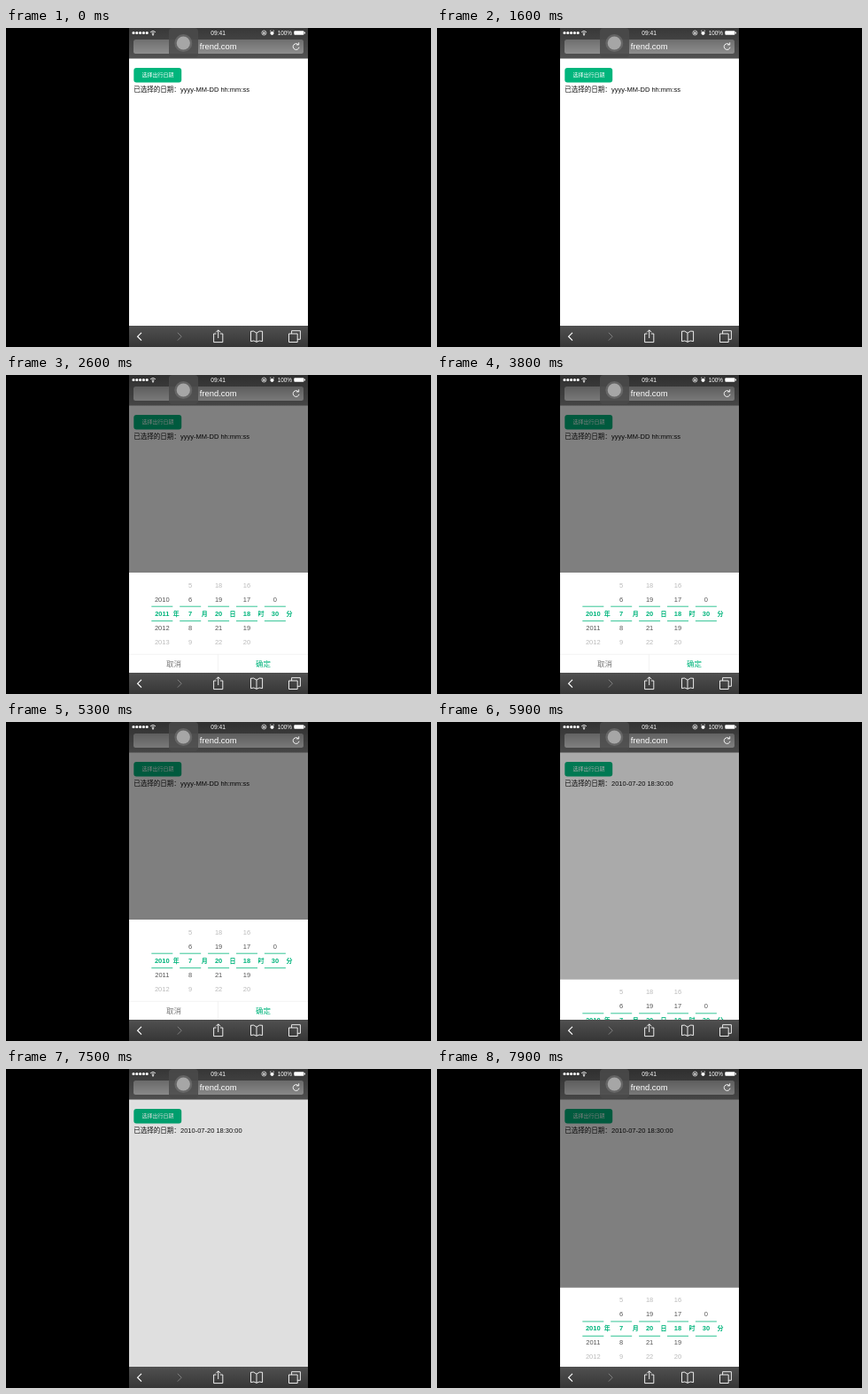
An HTML page that plays this animation: 480 px wide and 360 px high, repeating every 8 s.

```html
<!DOCTYPE html>
<html lang="zh">
<head>
<meta charset="utf-8">
<style>
html, body { margin: 0; width: 100%; height: 100%; overflow: hidden; background: #000; }
svg { display: block; width: 480px; height: 360px; }
text { font: 7.5px "Liberation Sans", "Noto Sans CJK SC", "Noto Sans CJK", sans-serif; }
.mid { text-anchor: middle; }
.bold { font-weight: bold; }
.line { fill: none; stroke: #fff; stroke-width: .9; }
</style>
</head>
<body>
<svg viewBox="0 0 480 360">
  <defs>
    <linearGradient id="head" x2="0" y2="1"><stop stop-color="#383838"/><stop offset="1" stop-color="#525252"/></linearGradient>
    <linearGradient id="field" x2="0" y2="1"><stop stop-color="#6e6e6e"/><stop offset="1" stop-color="#8e8e8e"/></linearGradient>
    <linearGradient id="foot" x2="0" y2="1"><stop stop-color="#505050"/><stop offset="1" stop-color="#363636"/></linearGradient>
    <clipPath id="page"><rect x="139" y="34" width="202" height="302"/></clipPath>
  </defs>

  <g clip-path="url(#page)">
    <rect x="139" y="34" width="202" height="302" fill="#fff"/>
    <rect x="144.3" y="45" width="53.9" height="16.5" rx="3" fill="#00b57c"/>
    <text class="mid" x="171.4" y="55.4" fill="#fff" style="font-size:6px">选择出行日期</text>
    <text x="144.3" y="72.4" fill="#111">已选择的日期：</text>
    <text id="date" x="197" y="72.4" fill="#111"></text>
    <rect id="shade" x="139" y="34" width="202" height="302"/>
    <g id="sheet">
      <rect x="139" width="202" height="114" fill="#fff"/>
      <g id="picker"></g>
      <path d="M139 92.3H341M239.5 92.3V114" stroke="#eee" stroke-width=".7"/>
      <text class="mid" x="189.5" y="105.6" fill="#777" style="font-size:8.5px">取消</text>
      <text class="mid" x="290.5" y="105.6" fill="#00b57c" style="font-size:8.5px">确定</text>
    </g>
  </g>

  <rect x="139" width="202" height="34.5" fill="url(#head)"/>
  <rect x="144" y="13" width="192" height="16" rx="2.5" fill="url(#field)"/>
  <rect id="tint" x="139" width="202" height="34.5"/>
  <rect x="184" y="0" width="33" height="33" rx="4" fill="#4a4a4a" opacity=".85"/>
  <circle cx="200.3" cy="17" r="10" fill="#777" opacity=".6"/>
  <circle cx="200.3" cy="17" r="7.6" fill="#a6a6a6"/>
  <g fill="#fff">
    <text class="mid" x="239.7" y="24.2" style="font-size:9.4px">frend.com</text>
    <text class="mid" x="239.6" y="7.8" style="font-size:6.6px">09:41</text>
    <text x="306.7" y="7.8" style="font-size:6.4px">100%</text>
    <path d="M144 5.5H160" stroke="#fff" stroke-width="3.2" stroke-linecap="round" stroke-dasharray="0 3.8"/>
    <rect x="325.3" y="3.3" width="11.2" height="4.4" rx="1"/>
    <rect x="337" y="4.6" width="1" height="1.8"/>
    <circle cx="166" cy="7.5" r=".9"/>
    <circle cx="300.5" cy="5.8" r="2.1"/>
    <path d="M298 3.6l1.3-1M303 3.6l-1.3-1" stroke="#fff" stroke-width=".8"/>
    <rect x="290.3" y="4.7" width="2.2" height="1.9"/>
  </g>
  <g class="line">
    <path d="M164.6 6.1q1.4-1.2 2.8 0M163.2 4.6q2.8-2.3 5.6 0"/>
    <circle cx="291.4" cy="5.5" r="2.5" stroke-width=".7"/>
    <path d="M330.2 18.8A3.4 3.4 0 1 0 331 21.7M328 18.9H330.7V16.3"/>
  </g>

  <rect x="139" y="336" width="202" height="24" fill="url(#foot)"/>
  <g class="line">
    <path d="M153 343.8L148.6 348.2L153 352.6" stroke-width="1.2"/>
    <path d="M193.8 343.8L198.2 348.2L193.8 352.6" stroke="#858585"/>
    <path d="M237.5 345H234.6V354.6H244.8V345H241.9M239.7 350V341M237.2 343.3L239.7 340.8L242.2 343.3"/>
    <path d="M283 344.2Q279.5 341 276.5 342.3V353.6Q280 352 283 354.3Q286 352 289.6 353.6V342.3Q286.5 341 283 344.2V354.3"/>
    <path d="M319.5 345H329.2V354.5H319.5ZM322.6 345V341.7H332.4V351.3H329.2"/>
  </g>
</svg>
<script>
const $ = id => document.getElementById(id);
const GREEN = '#00b57c', ROW = 16, MID = 46;
const columns = [
  // first value, count, step, selected index, unit
  [2010, 4, 1, 1, '年'], [5, 5, 1, 2, '月'], [18, 5, 1, 2, '日'], [16, 5, 1, 2, '时'], [0, 2, 30, 1, '分']
];
const clamp = x => Math.min(1, Math.max(0, x));
const ramp = (t, from, span) => clamp((t - from) / span);
const ease = x => 1 - (1 - x) ** 2.25;
const smooth = x => x * x * (3 - 2 * x);

function add(tag, attrs, label = '') {
  const el = document.createElementNS('http://www.w3.org/2000/svg', tag);
  for (const k in attrs) el.setAttribute(k, attrs[k]);
  el.textContent = label;
  return $('picker').appendChild(el);
}

const cells = [];
columns.forEach(([first, count, step, , unit], c) => {
  const x = 176.3 + 31.9 * c;
  add('path', { d: `M${x - 12} 38.2h24M${x - 12} 54.6h24`, stroke: GREEN, 'stroke-width': .8 });
  add('text', { x: x + 16, y: MID + 2.5, class: 'mid bold', fill: GREEN, style: 'font-size:7px' }, unit);
  for (let i = 0; i < count; i++)
    cells.push({ c, i, el: add('text', { x, class: 'mid' }, first + i * step) });
});

function draw(t) {
  const open = t < 7000
    ? ease(ramp(t, 1800, 600)) * (1 - ease(ramp(t, 5700, 600)))
    : ease(ramp(t, 7600, 600));
  const dim = t < 7000
    ? ramp(t, 1600, 400) * (1 - ramp(t, 5700, 600))
    : ramp(t, 7400, 400);
  const year = 1 - smooth(ramp(t, 3100, 700));

  $('sheet').setAttribute('transform', `translate(0 ${336 - 113 * open})`);
  $('shade').setAttribute('opacity', dim * .5);
  $('tint').setAttribute('opacity', dim * .15);
  $('date').textContent = t < 5800 ? 'yyyy-MM-DD hh:mm:ss' : '2010-07-20 18:30:00';

  for (const { c, i, el } of cells) {
    const d = i - (c ? columns[c][3] : year), far = Math.abs(d);
    el.setAttribute('y', MID + 2.7 + d * ROW);
    el.setAttribute('fill', far < .5 ? GREEN : far < 1.5 ? '#555' : '#bbb');
    el.setAttribute('font-weight', far < .5 ? 'bold' : 'normal');
    el.style.fontWeight = far < .5 ? 'bold' : 'normal';
    el.setAttribute('opacity', far > 2.5 ? 0 : 1);
  }
}

const start = performance.now();
function tick() {
  const t = (performance.now() - start) % 8000;
  draw(Math.floor(t / 100) * 100);
  requestAnimationFrame(tick);
}
tick();
</script>
</body>
</html>
```
